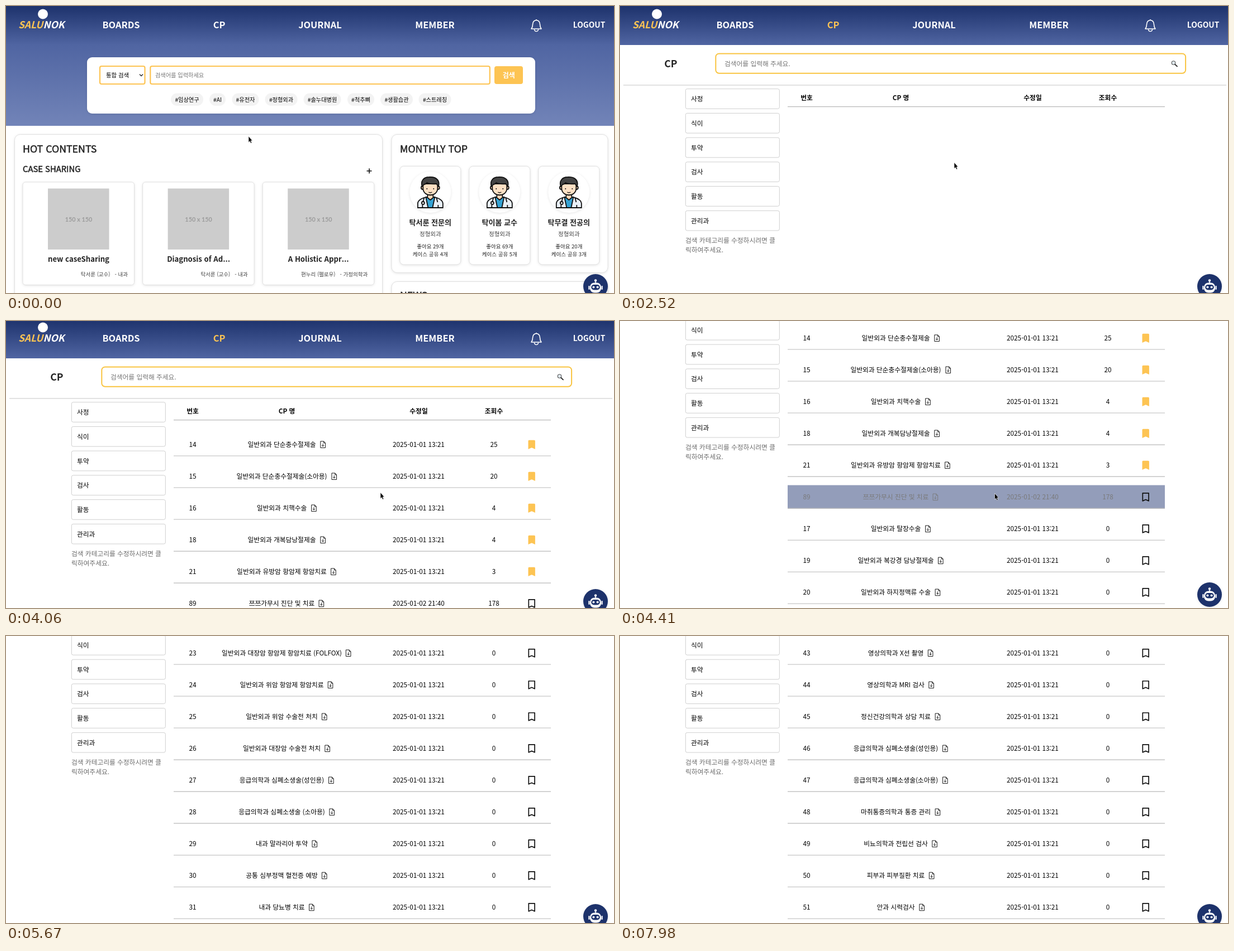
Recreate the animation shown at these times as an HTML page. Size 1088 px wide and 515 px high, loop 9030 ms.

```html
<!DOCTYPE html>
<html lang="ko">
<head>
<meta charset="utf-8">
<style>
  html, body { margin: 0; width: 100%; height: 100%; overflow: hidden; background: #fff; }
  svg { display: block; width: 100%; height: 100%; font-family: "Noto Sans CJK KR", "Noto Sans CJK", sans-serif; }
  .shadow { filter: drop-shadow(0 1.5px 2px rgba(0, 0, 0, .1)); }
</style>
</head>
<body>
<svg id="stage" viewBox="0 0 1088 515"></svg>
<script>
const LOOP = 9030, TICK = 70;
const BODY = 11.72;
const YELLOW = '#fdc453', NAVY = '#1d326b', HOVER = '#1e346f';
const stage = document.getElementById('stage');

// ---------- drawing helpers ----------
// Text is placed by its visual middle.
const text = (x, y, str, size = BODY, { w = 500, fill = '#000', anchor = 'middle', extra = '' } = {}) =>
  `<text x="${x}" y="${y + size * 0.365}" font-size="${size}" font-weight="${w}" fill="${fill}" text-anchor="${anchor}" ${extra}>${str}</text>`;
const left = (x, y, str, size, opts) => text(x, y, str, size, { ...opts, anchor: 'start' });
// A thin outline gives headings a medium weight.
const heading = (x, y, str, size) =>
  left(x, y, str, size, { fill: '#222', extra: 'stroke="#222" stroke-width=".5"' });
const box = (x, y, w, h, r = 0, fill = '#fff', stroke = 'none', sw = 1, extra = '') =>
  `<rect x="${x}" y="${y}" width="${w}" height="${h}" rx="${r}" fill="${fill}" stroke="${stroke}" stroke-width="${sw}" ${extra}/>`;
const card = (x, y, w, h, r) => box(x, y, w, h, r, '#fff', '#e0e0e0', 1, 'class="shadow"');
const rule = (x1, x2, y, color = '#b9b9b9') =>
  `<path d="M${x1} ${y}H${x2}" stroke="${color}" stroke-width="1.1"/>`;
const at = (x, y, content, attrs = '') => `<g transform="translate(${x} ${y})" ${attrs}>${content}</g>`;

const measure = document.createElement('canvas').getContext('2d');
measure.font = `500 ${BODY}px "Noto Sans CJK KR", "Noto Sans CJK", sans-serif`;

// ---------- shared header ----------
const bell = at(949, 35, `<g fill="none" stroke="#fff" stroke-width="1.6" stroke-linejoin="round">
  <path d="M-9 6Q-6.500 3-6.500-2C-6.500-12 6.500-12 6.500-2Q6.500 3 9 6Z"/>
  <path d="M-3.500 7A3.500 3.500 0 0 0 3.500 7M0-9.500V-11"/></g>`);

const header = height => box(0, 0, 1088, height, 0, 'url(#sky)') +
  '<circle cx="66" cy="14.500" r="9" fill="#fff"/>' +
  left(22, 34, `<tspan fill="${YELLOW}">SALU</tspan>NOK`, 17.4, { w: 700, fill: '#fff', extra: 'font-style="italic"' }) +
  [['BOARDS', 206], ['CP', 381.5], ['JOURNAL', 562], ['MEMBER', 767.5]].map(([label, x]) =>
    text(x, 34, label, 16.4, { w: 700, fill: '#fff', extra: label === 'CP' ? 'class="cp"' : '' })).join('') +
  bell + text(1043.5, 34, 'LOGOUT', 13.8, { w: 700, fill: '#fff' });

// ---------- home page ----------
const doctor = `<circle r="37" fill="#fff" class="shadow"/>
  <g stroke="#111" stroke-width="1.8" stroke-linejoin="round">
    <path d="M-22.500 28V20Q-22 13-8 9H8Q22 13 22.500 20V28Z" fill="#e9f0f8"/>
    <path d="M-8 9L-4 28H4L8 9Z" fill="#35a3d4"/>
    <path d="M-5 4V10L0 14L5 10V4Z" fill="#fbd8b8"/>
    <circle cx="-13.500" cy="-8" r="3" fill="#fbd8b8"/><circle cx="13.500" cy="-8" r="3" fill="#fbd8b8"/>
    <path d="M-13-15V-6C-12 9 12 9 13-6V-15Z" fill="#fde0c4"/>
    <path d="M-14.500-10C-18-20-12-27-2-27C10-28 18-21 14.500-10L11-15Q-2-14-6-17Q-8-14-11-14Z" fill="#444"/>
    <path d="M-11 10L-13 17M11 10L13 18M-14 28V23M14 28V23" fill="none"/>
    <circle cx="-13" cy="19.500" r="2.500" fill="#fff"/>
  </g>
  <path d="M-6-7v2M6-7v2M-3 0Q0 2 3 0" stroke="#111" stroke-width="1.5" fill="none"/>`;

const tags = [['임상연구', 324, 58], ['AI', 378.5, 29], ['유전자', 428.5, 48], ['정형외과', 492.5, 58],
  ['솔누대병원', 566, 67], ['척추뼈', 635, 48], ['생활습관', 699, 58], ['스트레칭', 767.5, 58]];
const cases = [['new caseSharing', '탁서룬 (교수)', '내과'], ['Diagnosis of Ad...', '탁서룬 (교수)', '내과'],
  ['A Holistic Appr...', '편누리 (펠로우)', '가정의학과']];
const doctors = [['탁서룬 전문의', 29, 4], ['탁이봄 교수', 69, 5], ['탁무결 전공의', 20, 3]];

const caseCard = ([title, author, dept], i) => at(30 + i * 214.6, 316,
  card(0, 0, 199.5, 184.5, 5) + box(45, 11.5, 109.5, 109.5, 0, '#ccc') +
  text(100, 67.5, '150 x 150', 10.8, { w: 700, fill: '#9c9c9c', extra: 'font-family="Lato, sans-serif"' }) +
  text(100, 138, title, 13.17, { w: 700, fill: '#222' }) +
  text(188, 166, `${author}\u00a0\u00a0 - ${dept}`, 9.5, { w: 400, fill: '#444', anchor: 'end' }));

const doctorCard = ([name, likes, shared], i) => at(759.3 + i * 124, 334,
  card(-54.5, -46.5, 109, 176.5, 7) + doctor +
  text(0, 54, name, 13, { w: 700, fill: '#222' }) +
  text(0, 75, '정형외과', 10.5, { w: 400, fill: '#444' }) +
  text(0, 98, `좋아요 ${likes}개`, 9.5, { fill: '#222' }) +
  text(0, 112, `케이스 공유 ${shared}개`, 9.5, { fill: '#222' }));

const home = header(215) +
  box(145, 92, 802, 101, 9, '#fff', 'none', 0, 'class="shadow"') +
  box(168, 108, 80.5, 32, 3, '#fff', YELLOW, 2.2) + left(179, 124.5, '통합 검색', 10.4) +
  '<path d="M239 122.500l3 3 3-3" fill="none" stroke="#222" stroke-width="1.300"/>' +
  box(258.3, 108, 607.5, 32, 3, '#fff', YELLOW, 2.2) +
  left(267, 124.5, '검색어를 입력하세요', 10.2, { w: 400, fill: '#757575' }) +
  box(874, 108, 51, 32, 4, YELLOW) + text(899.8, 124.5, '검색', 12, { w: 700, fill: '#fff' }) +
  tags.map(([tag, x, w]) => box(x - w / 2, 156.5, w, 22.5, 11.2, '#f3f3f3') + text(x, 168, '#' + tag, 10.2)).join('') +
  card(15.5, 230.5, 658, 320, 10) +
  heading(30, 256.5, 'HOT CONTENTS', 17.75) +
  heading(30, 292.5, 'CASE SHARING', 14.8) +
  '<path d="M645.500 296h9M650 291.500v9" stroke="#111" stroke-width="1.600"/>' +
  cases.map(caseCard).join('') +
  card(690, 230.5, 387, 248, 10) +
  heading(705, 256.5, 'MONTHLY TOP', 17.75) +
  doctors.map(doctorCard).join('') +
  card(690, 494.5, 387, 80, 10) + heading(705, 519.5, 'NEWS', 17.75);

// ---------- CP page ----------
const pages = [
  { ids: [14, 15, 16, 18, 21, 89, 17, 19, 20, 22], views: [25, 20, 4, 4, 3, 178], saved: 5, names: [
    '일반외과 단순충수절제술', '일반외과 단순충수절제술(소아용)', '일반외과 치핵수술', '일반외과 개복담낭절제술',
    '일반외과 유방암 항암제 항암치료', '쯔쯔가무시 진단 및 치료', '일반외과 탈장수술', '일반외과 복강경 담낭절제술',
    '일반외과 하지정맥류 수술', '일반외과 갑상선 수술'] },
  { first: 23, names: [
    '일반외과 대장암 항암제 항암치료 (FOLFOX)', '일반외과 위암 항암제 항암치료', '일반외과 위암 수술전 처치',
    '일반외과 대장암 수술전 처치', '응급의학과 심폐소생술(성인용)', '응급의학과 심폐소생술 (소아용)', '내과 말라리아 투약',
    '공통 심부정맥 혈전증 예방', '내과 당뇨병 치료', '내과 고혈압 치료'] },
  { first: 33, names: [
    '내과 고혈압 관리', '내과 폐렴 치료', '소아과 예방접종', '산부인과 제왕절개술', '정형외과 골절 수술',
    '신경외과 뇌출혈 수술', '이비인후과 편도절제술', '흉부외과 폐절제술', '신경과 뇌졸중 치료', '재활의학과 운동 치료'] },
  { first: 43, names: [
    '영상의학과 X선 촬영', '영상의학과 MRI 검사', '정신건강의학과 상담 치료', '응급의학과 심폐소생술(성인용)',
    '응급의학과 심폐소생술(소아용)', '마취통증의학과 통증 관리', '비뇨의학과 전립선 검사', '피부과 피부질환 치료',
    '안과 시력검사', '치과 구강검진'] },
];

const fileIcon = `<path d="M-4.300-5.800H1.500L4.300-2.800V5.800H-4.300ZM1.500-5.800V-2.800H4.300M0-1.500V3.300M-2 1.400L0 3.400L2 1.400"
  fill="none" stroke="currentColor" stroke-width=".9" stroke-linejoin="round"/>`;
const bookmark = saved => saved
  ? `<path d="M-6.200-6.500Q-6.200-8-4.700-8H4.700Q6.200-8 6.200-6.500V8.200L0 5.500L-6.200 8.200Z" fill="${YELLOW}"/>`
  : '<path d="M-5.400-7H5.400V7L0 4.600L-5.400 7Z" fill="none" stroke="#111" stroke-width="1.700" stroke-linejoin="round"/>';

const tableRow = (page, i) => {
  const id = page.ids ? page.ids[i] : page.first + i;
  const date = id === 89 ? '2025-01-02 21:40' : '2025-01-01 13:21';
  const ink = { fill: 'currentColor' };
  const iconX = 493.5 + measure.measureText(page.names[i]).width / 2 + 13;
  return at(0, 224.4 + i * 57.03,
    box(300, -21, 675, 42, 0, HOVER, 'none', 0, 'class="hover" opacity="0"') +
    text(334, 0, id, BODY, ink) + text(493.5, 0, page.names[i], BODY, ink) + at(iconX, 0.3, fileIcon) +
    text(738.5, 0, date, BODY, ink) + text(873, 0, page.views?.[i] ?? 0, BODY, ink) +
    at(940.7, 0.3, bookmark(i < (page.saved ?? 0))) + rule(300, 975, 20.6), 'class="row"');
};

const cpPage = header(70) +
  text(90.8, 104, 'CP', 17.56, { w: 700, fill: '#222' }) +
  box(171.3, 85.4, 840.8, 35.4, 6, '#fff', '#f9c440', 2) +
  left(187, 103.5, '검색어를 입력해 주세요.', BODY, { w: 400, fill: '#757575' }) +
  `<circle cx="990.500" cy="102" r="3.300" fill="#dfe8ee" stroke="#555" stroke-width="1.100"/>
   <path d="M993.300 104.800L997 108.300" stroke="#222" stroke-width="1.800" stroke-linecap="round"/>` +
  rule(6, 1085, 142, '#c6c6c6') +
  ['사정', '식이', '투약', '검사', '활동', '관리과'].map((label, i) =>
    box(117.3, 148.7 + i * 43.72, 168, 35.7, 3, '#fff', '#cfcfcf') + left(127, 167 + i * 43.72, label)).join('') +
  ['검색 카테고리를 수정하시려면 클', '릭하여주세요.'].map((line, i) =>
    left(117, 420.3 + i * 17.5, line, BODY, { w: 400, fill: '#6c6c6c' })).join('') +
  [['번호', 334], ['CP 명', 502.5], ['수정일', 738.5], ['조회수', 873]].map(([label, x]) =>
    text(x, 165, label, BODY, { w: 700 })).join('') +
  rule(300, 975, 180.6) +
  pages.map(page => `<g class="page">${page.names.map((_, i) => tableRow(page, i)).join('')}</g>`).join('');

const bot = `<circle r="22" fill="${NAVY}" class="shadow"/>
  <g fill="#fff"><circle cy="-10.500" r="2.200"/><rect x="-.8" y="-9" width="1.600" height="4"/>
  <rect x="-10" y="-6.500" width="20" height="18" rx="8"/>
  <rect x="-12.700" y="-1" width="2.200" height="7" rx="1"/><rect x="10.500" y="-1" width="2.200" height="7" rx="1"/></g>
  <rect x="-7.800" y="-3" width="15.600" height="9.500" rx="4.700" fill="${NAVY}"/>
  <circle cx="-3.600" cy="1.500" r="2" fill="#fff"/><circle cx="3.600" cy="1.500" r="2" fill="#fff"/>`;

stage.innerHTML = `<defs><linearGradient id="sky" gradientUnits="userSpaceOnUse" x1="0" y1="0" x2="0" y2="215">
    <stop stop-color="#1d326c"/><stop offset=".325" stop-color="#5065a2"/><stop offset="1" stop-color="#7284b8"/>
  </linearGradient></defs>
  <g id="home">${home}</g><g id="cp">${cpPage}</g><g id="bot">${bot}</g>
  <path id="cursor" d="M0-1.300V9.700L2.300 7.500L4 11.200L5.800 10.400L4.200 6.800H7Z" fill="#000" stroke="#fff" stroke-width=".6"/>`;

// ---------- motion ----------
const linear = k => k;
const smooth = k => k * k * (3 - 2 * k);
const easeOut = k => 1 - (1 - k) ** 2;
// Each key is [time, value, value, ...].
const track = (keys, t, ease = smooth) => {
  const next = keys.findIndex(key => key[0] > t);
  if (next === 0) return keys[0].slice(1);
  if (next < 0) return keys.at(-1).slice(1);
  const a = keys[next - 1], b = keys[next];
  const k = ease((t - a[0]) / (b[0] - a[0]));
  return a.slice(1).map((v, i) => v + (b[i + 1] - v) * k);
};

const cursorKeys = [[0, 434, 235], [140, 433, 234], [1050, 383, 38], [1400, 381, 36], [2030, 467, 208],
  [2520, 598, 282], [2660, 598, 282], [3500, 659, 302], [3850, 659, 302], [4060, 670, 309],
  [4410, 670.5, 310.5], [4690, 670, 312], [4970, 586, 509], [5040, 575, 530]];
const scrollKeys = [[2800, 0], [3220, 3], [4130, 3], [4400, 194]];
const botKeys = [[4200, 0], [4340, -12], [4480, -12], [4700, 0]];
const hoverKeys = {
  1: [[2660, 0], [2960, 1], [3410, 1], [3710, 0]],
  5: [[4270, 0], [4410, 0.48], [4600, 1], [4740, 1], [4900, 0.22], [4970, 0.07], [5040, 0]],
  8: [[4830, 0], [4910, 0.7], [4970, 0.54], [5180, 0]],
};
const HOME_END = 1400, ROWS_AT = 2660, PAGE_TIMES = [5670, 6790, 7980];

const $ = id => document.getElementById(id);
const pageNodes = [...document.querySelectorAll('.page')];
const rows = [...pageNodes[0].querySelectorAll('.row')];
const homeLink = $('home').querySelector('.cp');
$('cp').querySelector('.cp').setAttribute('fill', YELLOW);
const show = (node, visible) => { node.style.display = visible ? '' : 'none'; };
const move = (node, x, y) => node.setAttribute('transform', `translate(${x} ${y})`);

function render(t) {
  show($('home'), t < HOME_END);
  show($('cp'), t >= HOME_END);
  homeLink.setAttribute('fill', t >= 980 ? YELLOW : '#fff');

  const current = PAGE_TIMES.filter(time => t >= time).length;
  pageNodes.forEach((node, i) => show(node, t >= ROWS_AT && i === current));
  for (const [i, keys] of Object.entries(hoverKeys)) {
    const [amount] = track(keys, t, linear);
    const shade = Math.round(255 * amount);
    rows[i].style.color = `rgb(${shade}, ${shade}, ${shade})`;
    rows[i].querySelector('.hover').setAttribute('opacity', amount);
  }

  move($('cp'), 0, -track(scrollKeys, t, easeOut)[0]);
  move($('bot'), 1055, 503 + track(botKeys, t)[0]);
  move($('cursor'), ...track(cursorKeys, t));
}

const start = performance.now();
function frame() {
  const t = (performance.now() - start) % LOOP;
  render(Math.floor(t / TICK) * TICK);
  requestAnimationFrame(frame);
}
frame();
</script>
</body>
</html>
```
